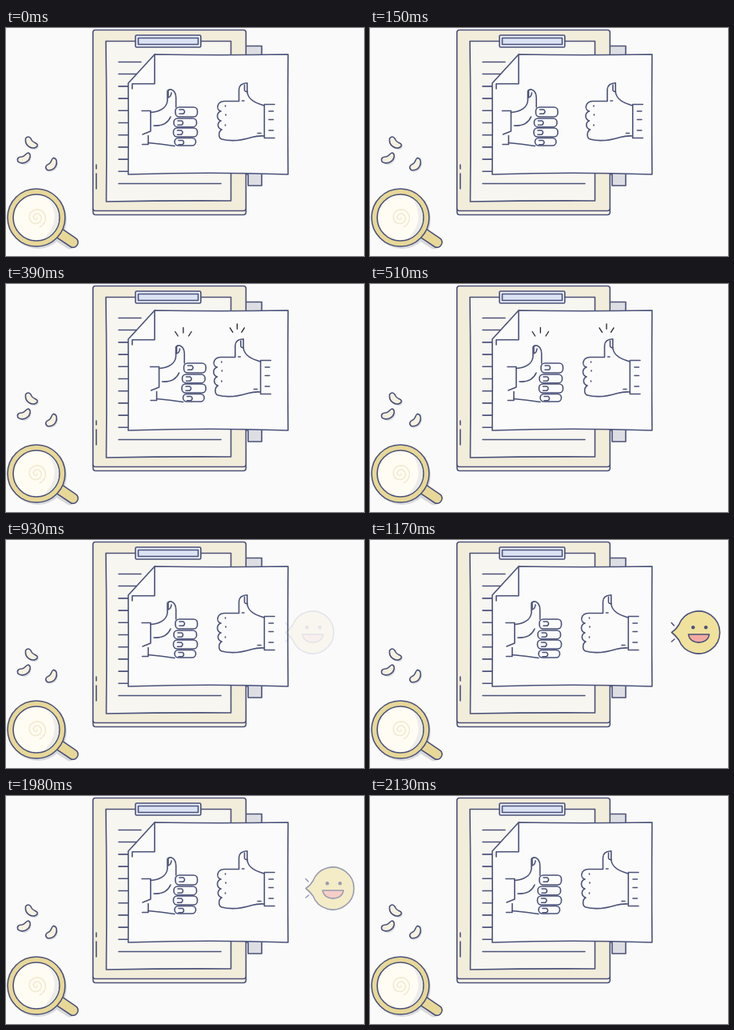
These frames come from a looping animation (448x285 px, 3150 ms). An HTML page:

```html
<!DOCTYPE html>
<html lang="en">
<head>
<meta charset="utf-8">
<title>Thumbs up</title>
<style>
html, body { margin: 0; width: 100%; height: 100%; overflow: hidden; background: #fafafa; }
svg { display: block; width: 100vw; height: 100vh; }
.ink { fill: none; stroke: #4b5279; stroke-width: 1.6; stroke-linecap: round; stroke-linejoin: round; }
.spark { stroke: #22242f; stroke-width: 1.3; }
</style>
</head>
<body>
<svg viewBox="0 0 448 285">
  <g class="ink" id="board">
    <path fill="#dcdee3" d="M300 22.5H320V197H303V183H300Z"/>
    <path fill="#f8f4e8" d="M109 226V230Q109 233.5 112 233.5H297Q300.300 233.500 300.300 230V226Z"/>
    <rect fill="#f2ecda" x="108.800" y="2.500" width="191.500" height="226" rx="3"/>
    <path fill="#f7f6f1" d="M125 16.500H281.500V216Q205 215.500 125.500 217Q126.500 115 125 16.500Z"/>
    <rect fill="#e9edf6" x="162" y="9" width="81.800" height="15" rx="1.500"/>
    <rect fill="#dbe2f4" x="165.500" y="12.500" width="75" height="8"/>
    <path d="M141 194.500H269M113 171V176M113 182V201"/>
    <path id="rules"/>
    <path fill="#fbfbfb" d="M186 33Q265 34.500 353 33Q352.300 110 353 183Q255 179.500 153 183Q153.500 125 153 69Z"/>
    <path d="M186 33V69.700H158V76"/>
  </g>

  <g class="ink" id="left">
    <path d="M170 103.500H181V129L171 133M178 134.500V145.500H170.500"/>
    <path d="M181 105.500C192 105 201 100 202 91V79Q203 76.500 207 77Q212.500 79 212.700 87V99"/>
    <path d="M203 78.500V87Q206.500 86 207 81M185 122Q201 123 206 111M178 143.500Q195 145 211 147.500"/>
  </g>

  <g class="ink" id="right">
    <path d="M291.500 91V77Q292 69 301.800 68.800V80C303 90 313 94 323 97"/>
    <path d="M298.500 71V78Q299.500 80 302 79.500M295.500 91H298"/>
    <path d="M291.500 91.500H273C264 92 262 102 269 104C263 106 263 114 269 116C264 118 264 125 270 127C265 130 266 138 270 139C285 143 300 139 308 136.500Q315 134.500 323 135"/>
    <path d="M336 95.500H323.300V137.500H336M329 104H334.500M329 114.500H334.500M329 128H334.500M315 131.500H319"/>
    <path d="M274.500 97V98M275 108V109M274.500 121V122"/>
  </g>

  <g class="ink" id="face">
    <path fill="#f0e19d" d="M386.500 106A26.500 26.500 0 1 1 386.500 125Q382 119 377.500 115.500Q383 112 386.500 106Z"/>
    <path fill="#f3aaa0" d="M398.500 118H424.500C423 131.500 400 131.500 398.500 118Z"/>
    <path d="M377.300 103.500L380.500 107M377.500 127L381 124"/>
    <g fill="#4b5279" stroke="none"><circle cx="404.300" cy="109.200" r="2.200"/><circle cx="420.300" cy="109.200" r="2.200"/></g>
  </g>

  <g id="beans"></g>

  <g class="ink">
    <path stroke="#d9dadd" stroke-width="13" d="M58 256L80 270"/>
    <circle cx="40" cy="240" r="36" fill="#d9dadd" stroke="none"/>
    <rect fill="#e8d898" x="30" y="-6.300" width="31.500" height="12.600" rx="6" transform="translate(38 237) rotate(34)"/>
    <circle fill="#e8d898" cx="38" cy="237" r="36"/>
    <circle fill="#fffcf4" cx="38" cy="237" r="29"/>
    <path fill="#ececeb" stroke="none" d="M53 213A28.200 28.200 0 0 1 47 263.600Q71 240 53 213Z"/>
    <path id="swirl" stroke="#f3e8cc" stroke-width="1.500"/>
  </g>
</svg>
<script>
const LOOP = 3150, STEP = 30;
const $ = id => document.getElementById(id);
const add = (id, markup) => $(id).insertAdjacentHTML('beforeend', markup);

// ruled lines on the clipboard page
let rules = 'M141 42.500H169M141 57.500H163';
for (let i = 2; i < 10; i++) rules += `M141 ${42.5 + i * 15.2}H153`;
$('rules').setAttribute('d', rules);

// curled fingers: x, y, width, height
for (const [x, y, w, h] of [[212, 99, 27.5, 12], [210, 113, 28.5, 10.7], [209.5, 125, 30, 11], [211, 137.500, 26.5, 9.5]]) {
  add('left', `<rect x="${x}" y="${y}" width="${w}" height="${h}" rx="4.800"/>
    <path d="M${x + 5} ${y + 3}h5q3 2.500 0 5.200h-5"/>`);
}

// rays over each thumb
const rays = (x, y, w) =>
  `<path class="spark" d="M${x - w} ${y + 5}l3.500 5.500M${x} ${y}v6.500M${x + w} ${y + 5}l-3.500 5.500"/>`;
add('left', rays(211.3, 54.5, 10.2));
add('right', rays(294, 49.8, 9));
const sparks = document.querySelectorAll('.spark');

const bean = 'M-7.500 -5C-4 -9 -1 -6 0 -3C2 1 6 0 7.500 3C7 7.500 1 8 -3 5.500C-7 3 -8 -1 -7.500 -5Z';
for (const [x, y, turn] of [[32, 143, 0], [22.500, 162, -70], [56.500, 170, -92]]) {
  const place = (dx, dy) => `transform="translate(${x + dx} ${y + dy}) rotate(${turn})"`;
  add('beans', `<path fill="#d9dadd" d="${bean}" ${place(1.5, 2)}/>
    <path class="ink" style="fill:#f6f1e0" d="${bean}" ${place(0, 0)}/>`);
}

let swirl = '';
for (let a = 0; a < 14; a += 0.3) {
  const r = 1 + a * 0.83;
  swirl += `${a ? 'L' : 'M'}${(38 + r * Math.cos(a)).toFixed(1)} ${(237 + r * Math.sin(a)).toFixed(1)}`;
}
$('swirl').setAttribute('d', swirl);

// eased value through [time, value] keys
function track(t, keys) {
  for (let i = 1; i < keys.length; i++) {
    const [t0, a] = keys[i - 1], [t1, b] = keys[i];
    if (t < t1) return a + (b - a) * (1 - Math.cos(Math.PI * (t - t0) / (t1 - t0))) / 2;
  }
  return keys[keys.length - 1][1];
}
const ramp = (t, a, b) => Math.min(1, Math.max(0, (t - a) / (b - a)));
const slide = (id, x) => $(id).setAttribute('transform', `translate(${x.toFixed(2)} 0)`);

const leftKeys = [[0, 0], [120, -6], [300, 16], [510, 2], [660, 0]];
const rightKeys = [[0, 0], [120, 6.5], [300, -9], [510, 2], [660, 0]];
const faceKeys = [[0, -30], [900, -30], [1080, 6], [1170, 0], [1800, 0], [1910, 6], [2130, -30]];

function draw() {
  const t = Math.floor(performance.now() % LOOP / STEP) * STEP;
  slide('left', track(t, leftKeys));
  slide('right', track(t, rightKeys));
  slide('face', track(t, faceKeys));
  $('face').setAttribute('opacity', ramp(t, 900, 1140) * (1 - ramp(t, 1860, 2130)));
  const glow = ramp(t, 300, 390) * (1 - ramp(t, 540, 630));
  sparks.forEach(s => s.setAttribute('opacity', glow));
  requestAnimationFrame(draw);
}
draw();
</script>
</body>
</html>
```
